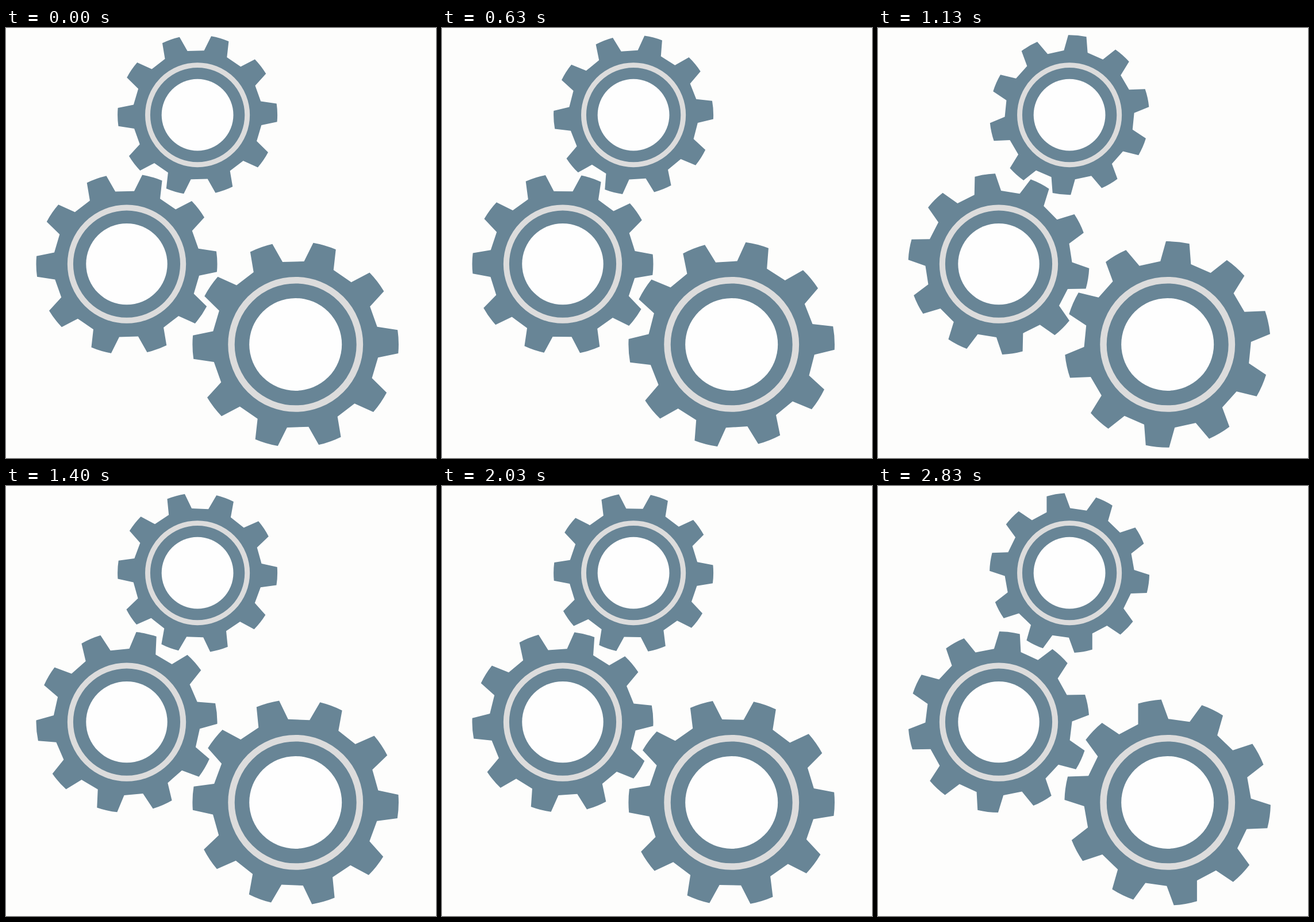
Animation of 748x748 px, one loop 2.86 s. Source, as an HTML page:

```html
<!DOCTYPE html>
<html lang="en">
<head>
<meta charset="utf-8">
<title>Gears</title>
<style>
  html, body { margin: 0; width: 100%; height: 100%; overflow: hidden; background: #fdfdfc; }
  svg { display: block; width: 100vw; height: 100vh; }
</style>
</head>
<body>
<svg id="stage" viewBox="0 0 748 748"></svg>
<script>
const LOOP = 2860, STEP = 100 / 3, LAST = 85;
const TEETH = 10, PITCH = 360 / TEETH;
const START = 16.45, SPEED = 1.806;
const TIP = { r: 100, half: 6.55 }, ROOT = { r: 81, half: 10.6 };

// Centre, radius and direction of each gear
const gears = [
  { x: 333.1, y: 151.2, r: 139, dir: 1 },
  { x: 210, y: 410.6, r: 157.5, dir: -1 },
  { x: 503.7, y: 550.4, r: 179.3, dir: 1 }
];

// Angles run clockwise from the top
function point(r, deg) {
  const a = deg * Math.PI / 180;
  return `${(r * Math.sin(a)).toFixed(3)} ${(-r * Math.cos(a)).toFixed(3)}`;
}

function gearPath() {
  let d = '';
  for (let i = 0; i < TEETH; i++) {
    const a = i * PITCH;
    d += `${i ? 'L' : 'M'}${point(ROOT.r, a - ROOT.half)}`
      + `L${point(TIP.r, a - TIP.half)}`
      + `A${TIP.r} ${TIP.r} 0 0 1 ${point(TIP.r, a + TIP.half)}`
      + `L${point(ROOT.r, a + ROOT.half)}`;
  }
  return d + 'Z';
}

const stage = document.getElementById('stage');
const outline = gearPath();
stage.innerHTML = gears.map(g => `
  <g transform="translate(${g.x} ${g.y}) scale(${g.r / 100})">
    <path d="${outline}" fill="#688596"/>
    <circle r="62.3" fill="none" stroke="#dcdcdc" stroke-width="6.4"/>
    <circle r="44.9" fill="#fefefe"/>
  </g>`).join('');
const wheels = stage.querySelectorAll('path');

function draw(now) {
  const step = Math.min(LAST, Math.floor((now % LOOP + 3.4) / STEP));
  // Nearly constant speed with a slight drift
  const turn = SPEED * step - 0.32 * Math.sin(2 * Math.PI * step / LAST);
  wheels.forEach((w, i) => w.setAttribute('transform', `rotate(${START + gears[i].dir * turn})`));
}

const begin = performance.now();
function tick() {
  draw(performance.now() - begin);
  requestAnimationFrame(tick);
}
tick();
</script>
</body>
</html>
```
